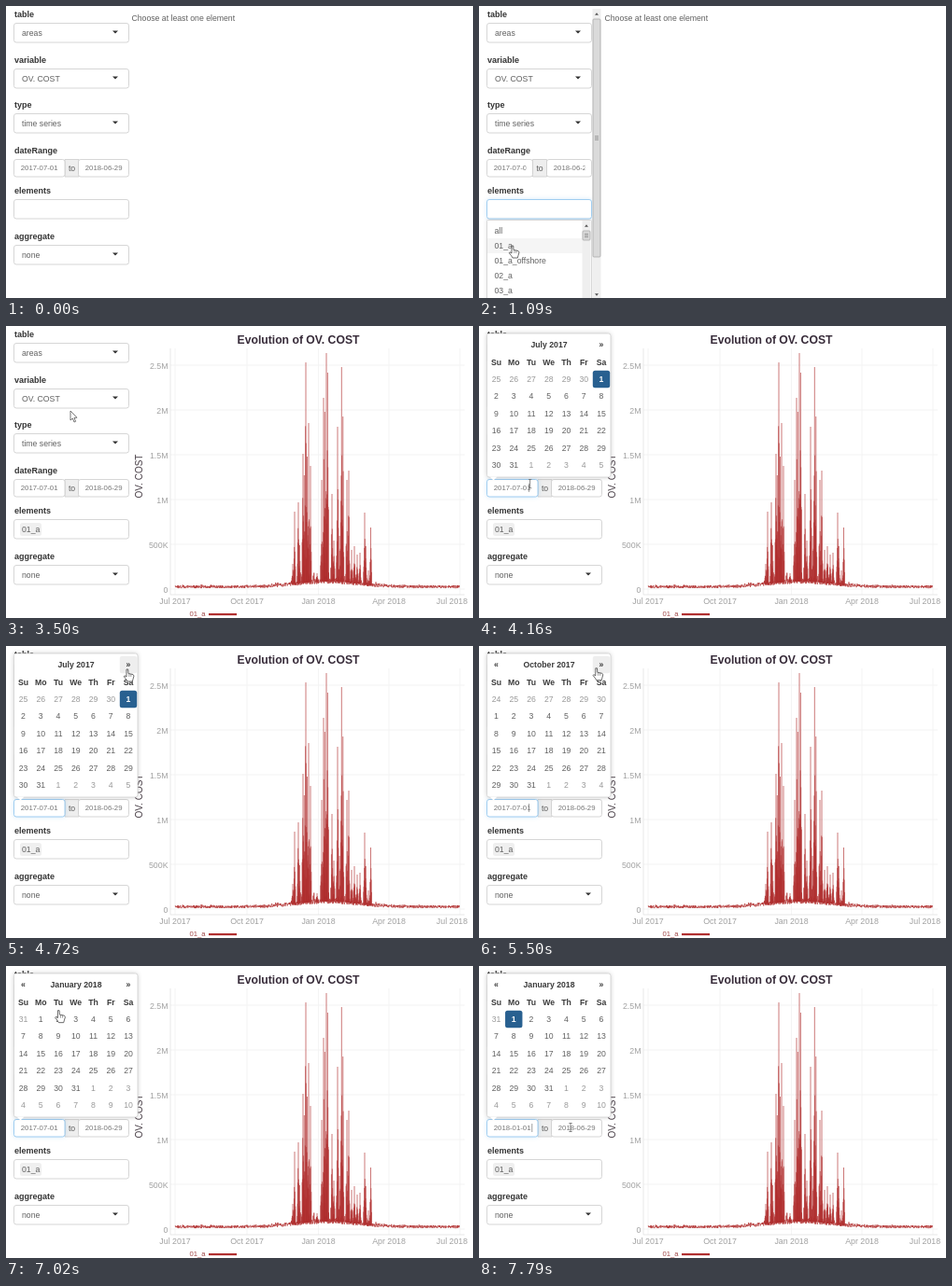
These frames come from a looping animation (500 by 313 pixels, 8 s). An HTML page with a canvas:

```html
<!DOCTYPE html>
<html lang="en">
<head>
<meta charset="utf-8">
<title>Cost explorer</title>
<style>
html, body { margin: 0; width: 100%; height: 100%; overflow: hidden; background: #fff; }
canvas { display: block; }
</style>
</head>
<body>
<canvas id="stage" width="500" height="313"></canvas>
<script>
const ctx = document.getElementById('stage').getContext('2d');
const LOOP = 8000, TICK = 109.9;
const FONT = '"Liberation Sans", Arial, sans-serif';
const RED = '#b02f2f';
const FOCUS = { stroke: '#8cc3ee', glow: 'rgba(102,175,233,.35)' };

// State changes, in ms
const OPEN_LIST = 420, PICK = 1290, CLOSE_LIST = 1720, SHOW_CHART = 1840;
const OPEN_CALENDAR = 4140, PICK_DAY = 7330;
const NEXT_MONTH = [4930, 5150, 5470, 5800, 6130, 6680];
const MONTHS = ['January', 'February', 'March', 'April', 'May', 'June', 'July',
  'August', 'September', 'October', 'November', 'December'];

// Pointer path: time, x, y, shape
const POINTER = [
  [90, 135, 205, 'arrow'], [320, 110, 217, 'beam'], [650, 110, 217, 'beam'],
  [860, 82, 236, 'hand'], [1080, 36, 257, 'hand'], [1440, 36, 257, 'hand'],
  [1640, 66, 215, 'arrow'], [2070, 75, 196, 'arrow'], [2750, 75, 196, 'arrow'],
  [3000, 112, 150, 'arrow'], [3200, 108, 95, 'arrow'], [3380, 60, 78, 'arrow'],
  [3490, 69, 91, 'arrow'], [3640, 69, 91, 'arrow'], [3940, 53, 173, 'beam'],
  [4160, 53, 173, 'beam'], [4280, 85, 100, 'hand'], [4600, 130, 25, 'hand'],
  [4900, 130, 25, 'hand'], [5200, 126, 24, 'hand'], [6700, 125, 23, 'hand'],
  [7120, 36, 55, 'hand'], [7420, 36, 55, 'hand'], [7600, 70, 125, 'arrow'],
  [7700, 98, 173, 'beam']
];

function text(str, x, y, { size = 8.7, color = '#606060', bold = false, align = 'left' } = {}) {
  ctx.font = `${bold ? 'bold ' : ''}${size}px ${FONT}`;
  ctx.fillStyle = color;
  ctx.textAlign = align;
  ctx.textBaseline = 'alphabetic';
  ctx.fillText(str, x, y + size * 0.35);
}

function box(x, y, w, h, { fill = '#fff', stroke = '#ccc', radius = 2.5, glow } = {}) {
  ctx.save();
  ctx.beginPath();
  ctx.roundRect(x, y, w, h, radius);
  if (glow) { ctx.shadowColor = glow; ctx.shadowBlur = 5; }
  ctx.fillStyle = fill;
  ctx.fill();
  ctx.restore();
  if (stroke) {
    ctx.strokeStyle = stroke;
    ctx.lineWidth = 0.8;
    ctx.stroke();
  }
}

function rect(x, y, w, h, color) {
  ctx.fillStyle = color;
  ctx.fillRect(x, y, w, h);
}

function polygon(points, fill, stroke) {
  ctx.beginPath();
  points.forEach(([x, y]) => ctx.lineTo(x, y));
  ctx.closePath();
  ctx.fillStyle = fill;
  ctx.fill();
  if (stroke) {
    ctx.strokeStyle = stroke;
    ctx.lineWidth = 0.8;
    ctx.stroke();
  }
}

function triangle(x, y, w, h, color) {
  polygon([[x - w / 2, y - h / 2], [x + w / 2, y - h / 2], [x, y + h / 2]], color);
}

function select(name, value, y, right) {
  text(name, 9, y, { bold: true, size: 9, color: '#333' });
  box(8.5, y + 9.5, right - 8.5, 20.5);
  text(value, 17, y + 20);
  triangle(right - 14.5, y + 19, 6, 3.2, '#333');
}

function dateInput(value, x, w, pad, focused) {
  box(x, 164.5, w, 18.5, focused ? FOCUS : {});
  ctx.save();
  ctx.beginPath();
  ctx.rect(x, 164, w - pad, 20);
  ctx.clip();
  text(value, x + 7.3, 173.5, { size: 7.75, color: '#777' });
  ctx.restore();
}

function form(t) {
  const listOpen = t >= OPEN_LIST && t < CLOSE_LIST;
  const calendarOpen = t >= OPEN_CALENDAR;
  const right = listOpen ? 120.5 : 131.5;
  const split = listOpen ? 57.5 : 63;
  const picked = t >= PICK;

  select('table', 'areas', 9, right);
  select('variable', 'OV. COST', 58, right);
  select('type', 'time series', 106, right);

  text('dateRange', 9, 155, { bold: true, size: 9, color: '#333' });
  box(split, 164.5, 15, 18.5, { fill: '#eee', radius: 0 });
  text('to', split + 7.5, 173.5, { align: 'center' });
  const second = split + (listOpen ? 15 : 14.5);
  const pad = listOpen ? 7 : 3;
  dateInput('2018-06-29', second, right - second, pad);
  dateInput(t >= PICK_DAY ? '2018-01-01' : '2017-07-01', 8.5, split - 8.5, pad, calendarOpen);
  const blinkOn = (Math.floor((t - 6258) / 530) & 1) === 0;
  if (calendarOpen && blinkOn) rect(t >= PICK_DAY ? 56.5 : 53, 169, 0.7, 9, '#777');

  text('elements', 9, 198, { bold: true, size: 9, color: '#333' });
  box(8.5, 207.5, right - 8.5, 20.5, listOpen ? FOCUS : {});
  if (picked) {
    box(15, 211, 23, 14, { fill: '#efefef', stroke: null });
    text('01_a', 17, 218);
  }
  if (listOpen) {
    dropdown(t, picked);
  } else {
    select('aggregate', 'none', 247, right);
  }
}

function scrollbar(x, top, bottom, thumbTop, thumbBottom) {
  const mid = (thumbTop + thumbBottom) / 2;
  rect(x, top, 9, bottom - top, '#efefef');
  triangle(x + 4.5, top + 5.5, 4, -2.5, '#555');
  triangle(x + 4.5, bottom - 3.5, 4, 2.5, '#555');
  box(x + 0.5, thumbTop, 8, thumbBottom - thumbTop, { fill: '#dadada', stroke: '#aaa', radius: 1 });
  for (let i = -1; i <= 1; i++) rect(x + 2.5, mid + i * 1.8 - 0.4, 4, 0.8, '#888');
}

function dropdown(t, picked) {
  const items = picked
    ? ['all', '01_a_offshore', '02_a', '03_a', '04_a']
    : ['all', '01_a', '01_a_offshore', '02_a', '03_a'];
  box(8.5, 229.5, 112, 100, { stroke: '#d0d0d0', glow: 'rgba(0,0,0,.12)', radius: 1 });
  rect(9, t < 960 ? 233 : 249, 102, 16, '#f5f5f5');
  items.forEach((item, i) => text(item, 16.5, 241 + i * 16));
  scrollbar(110.5, 230, 330, 241, 251);
  scrollbar(121.5, 3, 313, 14, 269);
}

const chartLine = buildChart();

function buildChart() {
  let seed = 11;
  const random = () => (seed = (seed * 16807) % 2147483647) / 2147483647;
  const winter = x => Math.exp(-(((x - 344) / 45) ** 2));
  const floor = x => 279.5 - winter(x) * 6;
  const spikes = [
    307, 255, 309, 199, 313, 189, 314.5, 235, 318, 137, 319.3, 160, 321, 39, 322.5, 140,
    324, 104, 326, 150, 333, 265, 338, 165, 340, 77, 341.3, 92, 343, 29, 344.4, 50,
    349, 180, 351, 230, 355, 108, 357, 225, 359.3, 44, 360.8, 97, 365, 165, 367, 155,
    370, 240, 373, 236, 376, 245, 379, 243, 384, 200, 385.3, 236, 388, 262, 390.5, 216
  ];
  const path = new Path2D();
  for (let x = 181; x <= 486; x += 0.25) {
    const spread = 1.6 + winter(x) * 1.2;
    const burst = random() < 0.15 ? random() * (1 + winter(x) * 7) : 0;
    path.lineTo(x, floor(x) + (random() * 2 - 1) * spread - burst);
  }
  for (let i = 0; i < spikes.length; i += 2) {
    const [x, top] = [spikes[i], spikes[i + 1]];
    const base = floor(x);
    // Jagged flanks make each peak thin at the tip and solid below
    for (let dx = -1.2; dx <= 1.2; dx += 0.3) {
      const part = Math.abs(dx) < 0.1 ? 1 : (1 - Math.abs(dx) / 1.5) * (0.3 + random() * 0.6);
      path.moveTo(x + dx, base);
      path.lineTo(x + dx, base - (base - top) * part);
    }
  }
  return path;
}

function chart() {
  const axis = { size: 8.8, color: '#a0a0a0' };
  ['0', '500K', '1M', '1.5M', '2M', '2.5M'].forEach((label, i) => {
    const y = 282 - i * 48;
    rect(176, y - 0.5, 315, 1, '#f4f4f4');
    text(label, 173.5, y + 0.5, { ...axis, align: 'right' });
  });
  ['Jul 2017', 'Oct 2017', 'Jan 2018', 'Apr 2018', 'Jul 2018'].forEach((label, i) => {
    const x = [181, 258, 334.5, 410, 486][i];
    rect(x - 0.5, 24, 1, 264, '#f4f4f4');
    text(label, Math.min(x, 477.5), 295, { ...axis, align: 'center' });
  });
  rect(175.5, 24, 1, 264, '#e8e8e8');
  rect(176, 287.5, 315, 1, '#e8e8e8');

  ctx.strokeStyle = RED;
  ctx.lineWidth = 0.65;
  ctx.lineJoin = 'round';
  ctx.stroke(chartLine);

  text('Evolution of OV. COST', 313, 14.5, { size: 12.2, bold: true, color: '#382c3a', align: 'center' });
  ctx.save();
  ctx.translate(142, 161);
  ctx.rotate(-Math.PI / 2);
  text('OV. COST', 0, 0, { size: 10, color: '#4a4048', align: 'center' });
  ctx.restore();
  text('01_a', 196.5, 308.5, { size: 7.7, color: '#a24a4a' });
  rect(217, 308, 30, 2.2, RED);
}

function calendar(t, pointer) {
  const step = NEXT_MONTH.filter(at => t >= at).length;
  const first = new Date(2017, 6 + step, 1);
  const lead = new Date(2017, 6 + step, 0);
  const start = lead.getDate() - lead.getDay();
  const colX = i => 18.5 + i * 18.75;
  const rowY = i => 57 + i * 18.4;
  const cell = (x, y, fill) => box(x - 9.2, y - 9.2, 18.4, 18.4, { fill, stroke: null });

  box(8.5, 8, 132.5, 154, { stroke: '#d2d2d2', glow: 'rgba(0,0,0,.22)' });
  polygon([[11.5, 161.5], [15.5, 165.5], [19.5, 161.5]], '#fff');

  const hoverCol = Math.round((pointer.x - 18.5) / 18.75);
  const hoverRow = Math.round((pointer.y - 57) / 18.4);
  if (pointer.shape === 'hand' && hoverRow !== -1 && hoverRow >= -2) {
    cell(colX(hoverCol), hoverRow === -2 ? 20 : rowY(hoverRow), '#eee');
  }
  const head = { bold: true, color: '#3a3a3a', align: 'center' };
  if (step) text('«', colX(0), 20, head);
  text(`${MONTHS[first.getMonth()]} ${first.getFullYear()}`, 75, 20, head);
  text('»', colX(6), 20, head);
  ['Su', 'Mo', 'Tu', 'We', 'Th', 'Fr', 'Sa'].forEach((day, i) => text(day, colX(i), 38.5, head));

  const chosen = t >= PICK_DAY ? new Date(2018, 0, 1) : new Date(2017, 6, 1);
  for (let i = 0; i < 42; i++) {
    const day = new Date(lead.getFullYear(), lead.getMonth(), start + i);
    const x = colX(i % 7), y = rowY(Math.floor(i / 7));
    const active = +day === +chosen;
    if (active) cell(x, y, '#286090');
    const color = active ? '#fff' : day.getMonth() === first.getMonth() ? '#606060' : '#999';
    text(day.getDate(), x, y, { color, align: 'center', bold: active });
  }
}

function pointerAt(t) {
  const i = POINTER.findLastIndex(key => t >= key[0]);
  if (i < 0) return null;
  const a = POINTER[i], b = POINTER[i + 1] || a;
  const k = b === a ? 0 : (t - a[0]) / (b[0] - a[0]);
  return { x: a[1] + (b[1] - a[1]) * k, y: a[2] + (b[2] - a[2]) * k, shape: a[3] };
}

function drawPointer({ x, y, shape }) {
  ctx.save();
  ctx.translate(x, y);
  if (shape === 'arrow') {
    polygon([[0, 0], [0, 10], [2.3, 8], [4, 12], [5.6, 11.3], [4, 7.5], [7, 7.2]], '#fff', '#555');
  } else if (shape === 'beam') {
    rect(-0.4, -5, 0.8, 10, '#666');
    rect(-1.7, -5, 3.4, 0.7, '#666');
    rect(-1.7, 4.3, 3.4, 0.7, '#666');
  } else {
    polygon([[-1, 0], [0.7, 0], [1, 4.5], [6, 5.5], [7, 7], [6, 10.5], [5.3, 13], [0, 13],
      [-1.5, 10.5], [-3.7, 7.8], [-3, 6.8], [-1, 8]], '#fff', '#444');
    for (const dx of [1.6, 3.6]) rect(dx, 5, 0.6, 3, '#666');
  }
  ctx.restore();
}

function frame(now) {
  const elapsed = now % LOOP;
  const t = elapsed < 100 ? 0 : 100 + TICK * Math.floor((elapsed - 90) / TICK);
  const pointer = pointerAt(t);
  rect(0, 0, 500, 313, '#fff');
  if (t >= SHOW_CHART) chart();
  else text('Choose at least one element', 134.5, 12.5);
  form(t);
  if (t >= OPEN_CALENDAR) calendar(t, pointer);
  if (pointer) drawPointer(pointer);
  requestAnimationFrame(frame);
}
requestAnimationFrame(frame);
</script>
</body>
</html>
```
